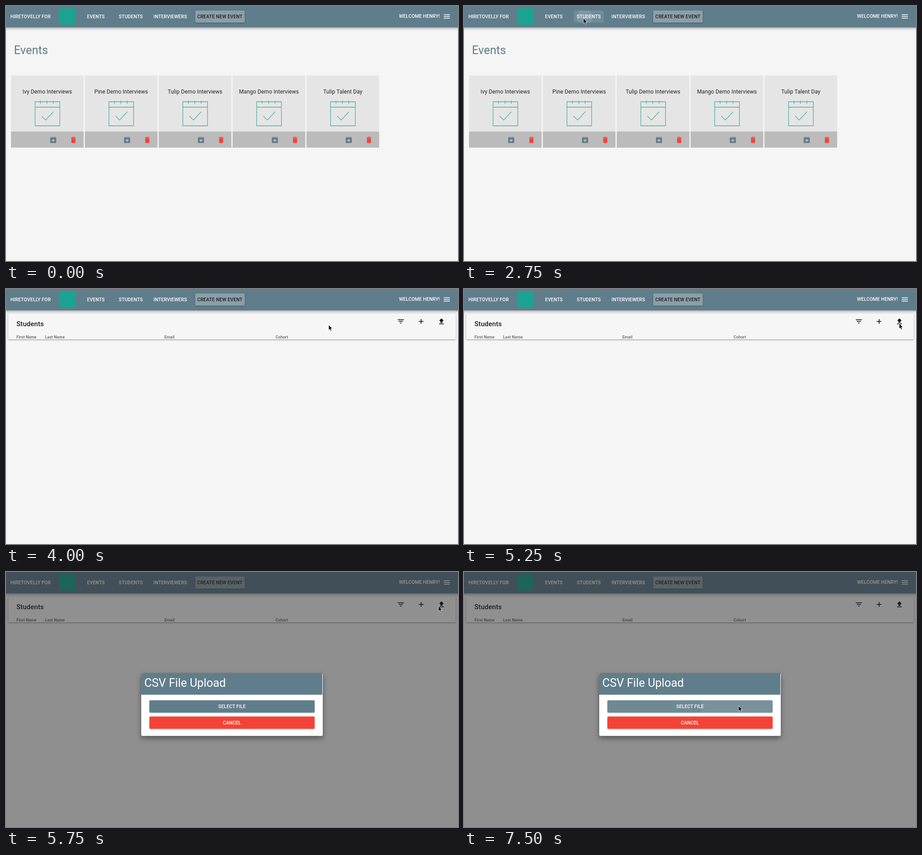
An HTML page that plays this animation: 996 by 562 pixels, repeating every 8000 ms.

```html
<!DOCTYPE html>
<html lang="en">
<head>
<meta charset="utf-8">
<title>Event planner</title>
<style>
  html, body { margin: 0; width: 100%; height: 100%; overflow: hidden; background: #f5f5f5; }
  svg { display: block; width: 996px; height: 562px; }
  text { font-family: Roboto, sans-serif; fill: #212121; }
  .btn { font-size: 10.46px; font-weight: 500; letter-spacing: .01em; fill: #fff; }
  .mid { text-anchor: middle; }
  .big { font-size: 25.4px; }
  .card { font-size: 12px; letter-spacing: .01em; }
  .head { font-size: 8.96px; font-weight: 700; fill: #757575; }
  .line { fill: none; stroke: #4db0a3; stroke-width: 1.3; }
  .slate { fill: #607d8b; }
  .red { fill: #f44336; }
  .raised { filter: drop-shadow(0 1.5px 1.5px rgba(0,0,0,.28)); }
  .bar { filter: drop-shadow(0 1px 3px rgba(0,0,0,.5)); }
  .panel { filter: drop-shadow(0 1px 1.8px rgba(0,0,0,.45)); }
  .float { filter: drop-shadow(0 5px 6px rgba(0,0,0,.42)); }
</style>
</head>
<body>
<svg viewBox="0 0 996 562">
  <defs>
    <clipPath id="studentsClip"><rect x="242" y="10" width="66" height="26.5" rx="2"/></clipPath>
    <clipPath id="selectClip"><rect x="316" y="282.7" width="364" height="27" rx="2"/></clipPath>
    <path id="archive" d="M20.54 5.23l-1.39-1.68C18.88 3.21 18.47 3 18 3H6c-.47 0-.88.21-1.16.55L3.46 5.23C3.17 5.57 3 6.02 3 6.5V19c0 1.1.9 2 2 2h14c1.1 0 2-.9 2-2V6.5c0-.48-.17-.93-.46-1.27zM12 17.5L6.5 12H10v-2h4v2h3.5L12 17.5zM5.12 5l.81-1h12l.94 1H5.12z"/>
    <path id="trash" d="M6 19c0 1.1.9 2 2 2h8c1.1 0 2-.9 2-2V7H6zM19 4h-3.5l-1-1h-5l-1 1H5v2h14z"/>
    <path id="menu" d="M3 18h18v-2H3zm0-5h18v-2H3zm0-7v2h18V6z"/>
    <path id="filter" d="M10 18h4v-2h-4zM3 6v2h18V6zm3 7h12v-2H6z"/>
    <path id="plus" d="M19 13h-6v6h-2v-6H5v-2h6V5h2v6h6z"/>
    <path id="upload" d="M9 16h6v-6h4l-7-7-7 7h4zm-4 2h14v2H5z"/>
  </defs>
  <rect width="996" height="562" fill="#f5f5f5"/>

  <g id="events">
    <text class="big slate" x="17.5" y="106">Events</text>
    <g id="cards"></g>
  </g>

  <g id="students">
    <rect class="panel" x="5" y="53.5" width="986" height="57.5" rx="1.5" fill="#f6f6f6"/>
    <text x="23" y="82" font-size="14.94" font-weight="500" letter-spacing=".07">Students</text>
    <text class="head" x="23" y="108.8">First Name</text>
    <text class="head" x="86" y="108.8">Last Name</text>
    <text class="head" x="349" y="108.8">Email</text>
    <text class="head" x="594" y="108.8">Cohort</text>
    <circle id="uploadRipple" cx="959" cy="77" r="15.5" fill-opacity=".12"/>
    <g id="tools"></g>
  </g>

  <rect class="bar slate" x="-10" y="-10" width="1016" height="57"/>
  <text class="btn" x="9.7" y="26.9">HIRETOVELLY FOR</text>
  <rect x="117" y="5" width="36" height="36" fill="#1aa390"/>
  <g id="nav"></g>
  <circle id="navRipple" cx="266" cy="24" fill="#fff" clip-path="url(#studentsClip)"/>
  <rect class="raised" x="417" y="10" width="109" height="26.5" rx="2" fill="#8c9fa9"/>
  <text class="btn mid" x="471.3" y="26.9" style="fill:#1b1f21">CREATE NEW EVENT</text>
  <text class="btn" x="866" y="26.3">WELCOME HENRY!</text>
  <g id="burger"></g>

  <rect id="shade" width="996" height="562" fill="#212121" fill-opacity=".48"/>
  <g id="dialog">
    <rect class="float" x="298" y="223" width="400" height="138.3" rx="3" fill="#fff"/>
    <path class="slate" d="M298 270.5V226a3 3 0 0 1 3-3H697V270.5Z"/>
    <text class="big" x="304.7" y="252.7" style="fill:#fff">CSV File Upload</text>
    <rect id="select" class="raised" x="316" y="282.7" width="364" height="27" rx="2"/>
    <circle id="selectRipple" cx="605" cy="298" r="84" fill="#fff" fill-opacity=".07" clip-path="url(#selectClip)"/>
    <text class="btn mid" x="498" y="300">SELECT FILE</text>
    <rect class="raised red" x="316" y="318.4" width="364" height="27" rx="2"/>
    <text class="btn mid" x="498" y="335.7">CANCEL</text>
  </g>

  <path id="cursor" d="M0 0V11.6L2.6 9.3 4.4 13.4 6.4 12.5 4.6 8.5H8.2Z" fill="#000" stroke="#fff" stroke-width=".8"/>
</svg>
<script>
const $ = id => document.getElementById(id);
const show = (id, on) => $(id).style.display = on ? '' : 'none';
const icon = (name, x, y, cls = '', fill = '') =>
  `<use href="#${name}" class="${cls}" ${fill && `fill="${fill}"`} transform="translate(${x} ${y}) scale(.747) translate(-12 -12)"/>`;

const titles = ['Ivy Demo Interviews', 'Pine Demo Interviews', 'Tulip Demo Interviews',
                'Mango Demo Interviews', 'Tulip Talent Day'];
$('cards').innerHTML = titles.map((title, i) => `
  <g transform="translate(${11 + 162.8 * i} 153)">
    <rect width="160" height="159" fill="#e5e5e5"/>
    <rect y="123.7" width="160" height="35.5" fill="#bbb"/>
    <text class="card mid" x="80" y="40">${title}</text>
    <path class="line" d="M53 58H107.5V111H53ZM53 70H107.5M65 55.5V62.5M79.2 55.5V62.5M93.2 55.5V62.5M67.5 89.5L76.5 98.5 93.5 80"/>
    ${icon('archive', 93, 142.3, 'slate')}${icon('trash', 137.5, 142.3, 'red')}
  </g>`).join('');

const tabs = [['EVENTS', 166, 64], ['STUDENTS', 242, 66], ['INTERVIEWERS', 318, 88]];
$('nav').innerHTML = tabs.map(([label, x, w]) => `
  <rect id="${label}" x="${x}" y="10" width="${w}" height="26.5" rx="2" fill="#fff" fill-opacity=".11"/>
  <text class="btn mid" x="${x + w / 2}" y="26.9">${label}</text>`).join('');

$('tools').innerHTML = icon('filter', 870, 71.5) + icon('plus', 914.7, 71.5) + icon('upload', 959.5, 71.5);
$('burger').innerHTML = icon('menu', 971.3, 23, '', '#fff');

// Pointer path: time, x, y
const path = [[500, 541, 51], [750, 362, 33], [1000, 205, 27], [1250, 198, 28], [1500, 266, 32],
  [1750, 272, 36], [2000, 263, 27], [3750, 263, 27], [4000, 711, 79], [5000, 959, 76],
  [5500, 959, 76], [5750, 953, 75], [6250, 953, 75], [7250, 605, 295], [8000, 605, 295]];

function pointer(t) {
  const i = Math.max(1, path.findIndex(p => p[0] >= t));
  const [t0, x0, y0] = path[i - 1], [t1, x1, y1] = path[i];
  const u = Math.max(0, (t - t0) / (t1 - t0)), e = u * u * (3 - 2 * u);
  return [x0 + (x1 - x0) * e, y0 + (y1 - y0) * e];
}

function draw(t) {
  const [x, y] = pointer(t);
  const over = (left, top, w, h) => t >= 500 && x >= left && x <= left + w && y >= top && y <= top + h;
  show('cursor', t >= 500);
  $('cursor').setAttribute('transform', `translate(${x} ${y})`);

  show('events', t < 3000);
  show('students', t >= 3000);
  for (const [label, left, w] of tabs) show(label, over(left, 10, w, 27));

  const press = (t - 2750) / 250;
  show('navRipple', press >= 0 && press < 2);
  $('navRipple').setAttribute('r', 18 + 25 * Math.max(0, press));
  $('navRipple').setAttribute('fill-opacity', Math.max(0, .1 - .05 * press));
  show('uploadRipple', t >= 5500 && t < 5750);

  // The dialog grows out of the upload button
  const k = t < 5750 ? .95 : 1;
  show('shade', t >= 5500);
  show('dialog', t >= 5500);
  $('dialog').setAttribute('transform', `translate(${960 * (1 - k)} ${72 * (1 - k)}) scale(${k})`);
  $('dialog').setAttribute('opacity', k < 1 ? .97 : 1);
  $('select').setAttribute('fill', over(316, 283, 364, 27) ? '#6e8994' : '#607d8b');
  show('selectRipple', t >= 7500);
}

const start = performance.now();
function tick() {
  const t = (performance.now() - start) % 8000;
  draw(Math.floor(t / 250) * 250);
  requestAnimationFrame(tick);
}
tick();
</script>
</body>
</html>
```
